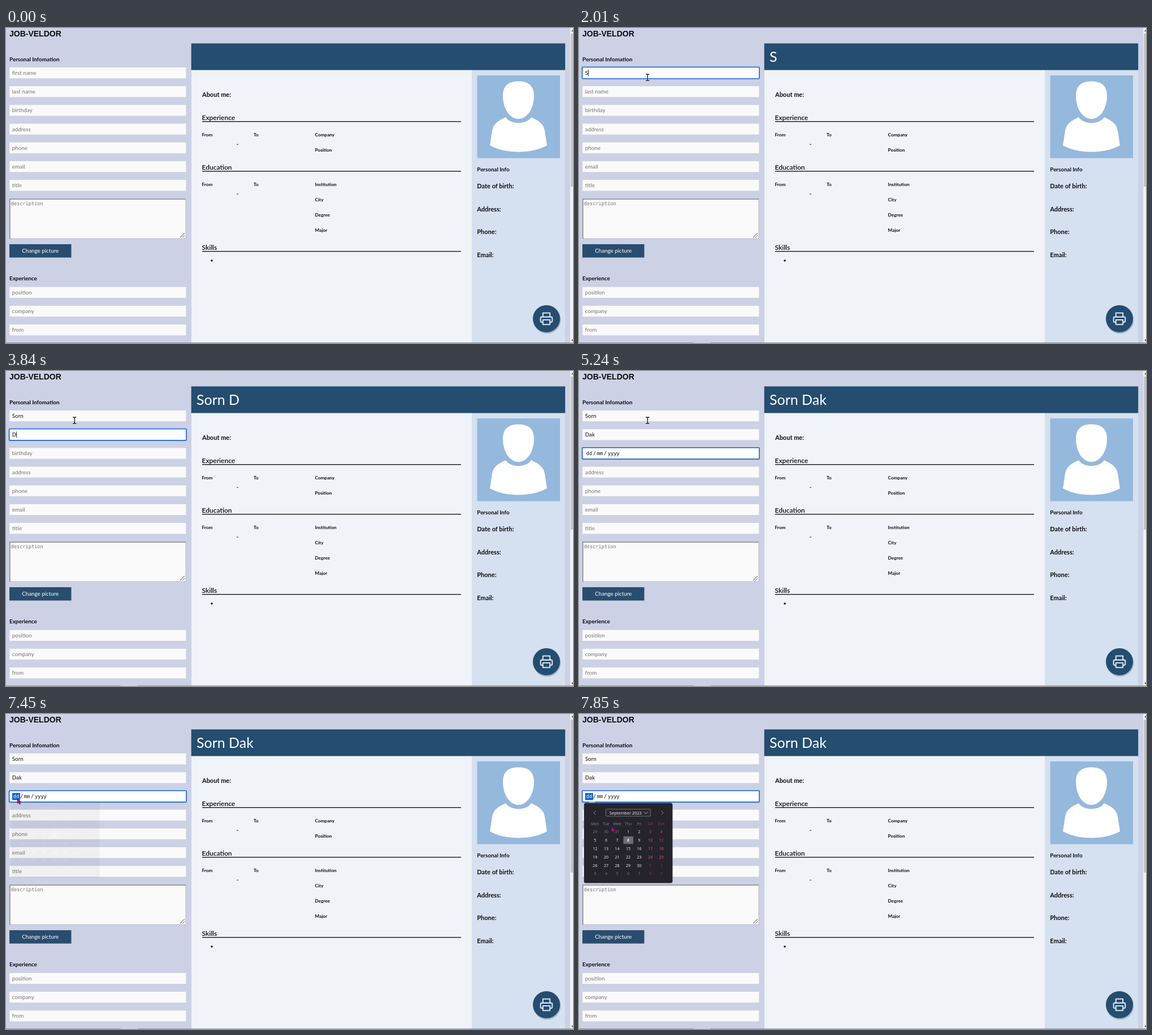
Animation of 1003 by 558 pixels, one loop 8000 ms. Source, as an HTML page:

```html
<!DOCTYPE html>
<html lang="en">
<head>
<meta charset="utf-8">
<title>Resume form</title>
<style>
html, body { margin: 0; width: 100%; height: 100%; overflow: hidden; background: #ccd1e5; }
svg { display: block; width: 100%; height: 100%; }
text { font-family: Lato, sans-serif; white-space: pre; }
.mono { font-family: "DejaVu Sans Mono", monospace; }
.arial { font-family: "Liberation Sans", sans-serif; }
.cal text { font-family: "Open Sans", sans-serif; }
</style>
</head>
<body>
<svg id="stage" viewBox="0 0 1003 558" preserveAspectRatio="none"></svg>
<script>
const LOOP = 8000;
const NS = "http://www.w3.org/2000/svg";
const stage = document.getElementById("stage");

function add(tag, attrs, parent = stage) {
  const el = document.createElementNS(NS, tag);
  for (const k in attrs) el.setAttribute(k, attrs[k]);
  parent.appendChild(el);
  return el;
}
const box = (x, y, width, height, fill, more, parent) =>
  add("rect", { x, y, width, height, fill, ...more }, parent);
const line = (d, stroke, width, parent) =>
  add("path", { d, stroke, "stroke-width": width, fill: "none" }, parent);
function label(str, x, y, size, more, parent) {
  const el = add("text", { x, y, "font-size": size, fill: "#0b0b0f", ...more }, parent);
  el.textContent = str;
  return el;
}
const bold = (str, x, y, size) => label(str, x, y, size, { "font-weight": 700 });
const show = (el, on) => el.setAttribute("visibility", on ? "visible" : "hidden");

// Page, scrollbar and bottom edge
box(0, 0, 1003, 558, "#ccd1e5");
box(998, 0, 5, 558, "#f1f1f3");
box(999, 10, 4, 271, "#c3c3c7");
add("path", { d: "M1000 6l2-3 2 3zM1000 552l2 3 2-3z", fill: "#606064" });

// Preview sheet
box(328, 74, 496, 484, "#f0f3f8");
box(824, 74, 165, 484, "#d5e0f0");
box(327.7, 27.3, 661.5, 47.2, "#244d70");
const headName = label("", 337, 60, 25, { fill: "#fff" });
bold("About me:", 347, 121.5, 11);
[["Experience", 163], ["Education", 251], ["Skills", 393]].forEach(([s, y]) => {
  label(s, 346.5, y, 12, { "font-weight": 600 });
  box(347, y + 2, 458, 1.4, "#15171c");
});
[192, 280].forEach(y => {
  bold("From", 346.5, y, 8.2);
  bold("To", 438, y, 8.2);
  box(408, y + 13.7, 3, 1, "#222");
});
["Company", "Position"].forEach((s, i) => bold(s, 546.6, 192 + 27 * i, 8.2));
["Institution", "City", "Degree", "Major"].forEach((s, i) => bold(s, 546.6, 280 + 27 * i, 8.2));
add("circle", { cx: 364, cy: 412, r: 1.8, fill: "#111" });

// Picture and contact column
box(833.5, 84, 146.5, 146.5, "#95b8dd");
add("path", { fill: "#fff", d:
  "M879 120C879 102 889 94.5 906.5 94.5S934 102 934 120C934 143 922 161 906.5 161S879 143 879 120Z" +
  "M884 158C892 171.5 921 171.5 929 158C944 165 951 170 953 182L957 208" +
  "C942 216 925 219.5 906.5 219.5S871 216 856 208L860 182C862 170 869 165 884 158Z" });
bold("Personal Info", 833.3, 254.3, 9.8);
["Date of birth:", "Address:", "Phone:", "Email:"].forEach((s, i) => bold(s, 833.3, 284 + 40.7 * i, 11));

// Print button
add("circle", { cx: 957, cy: 517, r: 24.3, fill: "#1b2b45", opacity: 0.25 });
add("circle", { cx: 956, cy: 515, r: 24, fill: "#244d70" });
const icon = add("g", { transform: "translate(943.6 502.6) scale(1.03)", "stroke-linejoin": "round" });
line("M6 9V2H18V9M6 18H4a2 2 0 0 1-2-2V11a2 2 0 0 1 2-2H20a2 2 0 0 1 2 2V16a2 2 0 0 1-2 2H18M6 14H18V22H6Z",
  "#d9e2ef", 2, icon);

// Form
label("JOB-VELDOR", 6, 14.6, 14, { class: "arial", "font-weight": 700 });
bold("Personal Infomation", 6, 58.6, 9.9);
bold("Experience", 6, 447.3, 9.9);

const PITCH = 33.2;
function makeField(hint, y) {
  const bg = box(6.3, y, 312, 19.2, "#fafafa");
  const text = label(hint, 10.8, y + 13, 9.8, { fill: "#757575" });
  return { hint, y, bg, text };
}
const fields = ["first name", "last name", "birthday", "address", "phone", "email", "title"]
  .map((s, i) => makeField(s, 69.9 + PITCH * i));
["position", "company", "from"].forEach((s, i) => makeField(s, 458.8 + PITCH * i));

box(6.5, 303, 311.5, 70, "#fafafa");
line("M318 303V373H6.5", "#b9bcc8", 1);
line("M6.8 373.5V303.2H318", "#76777d", 1.3);
label("description", 8.6, 313.8, 8.65, { class: "mono", fill: "#757575" });
line("M308 371L316 363M312 371L316 367", "#55565c", 1);
box(6, 383, 109.5, 23.6, "#294d6e");
label("Change picture", 60.7, 398.4, 9.8, { fill: "#fff", "text-anchor": "middle" });

box(0, 557, 1003, 1, "#8f93a3");
const edgeGap = box(203, 557, 30, 1, "#c9cde0");

// Date parts
const date = add("g", {});
const selection = box(11, 140, 14, 12.4, "#0f62c8", {}, date);
const dateParts = [["dd", 12.7], ["/", 25], ["mm", 31.8], ["/", 44], ["yyyy", 51]]
  .map(([s, x]) => label(s, x, 149.2, 8.65, { class: "mono" }, date));

const ring = box(5.6, 0, 313.4, 20.4, "none", { stroke: "#1766d1", "stroke-width": 1.6, rx: 1 });
const caret = box(0, 0, 0.9, 11, "#111");
const glow = add("circle", { r: 7, fill: "#e6e03c" });
const trace = add("ellipse", { cx: 23, cy: 156, rx: 5, ry: 2, fill: "#eeeaa0", opacity: 0.6 });

// Calendar popup
const clip = add("clipPath", { id: "under" }, add("defs", {}));
box(0, 157, 200, 200, "#000", {}, clip);
const popup = add("g", { class: "cal", "clip-path": "url(#under)" });
const cal = add("g", {}, popup);
box(8.8, 157.5, 156.7, 142, "#25242d", { rx: 3.5 }, cal);
line("M29.5 171.5L26 175L29.5 178.5M145.5 171.5L149 175L145.5 178.5", "#9a9aa2", 0.9, cal);
box(47.5, 168.5, 79, 12.6, "#2b2a33", { stroke: "#77777f", "stroke-width": 0.9, rx: 1 }, cal);
label("September 2022", 54, 177.7, 7.4, { fill: "#f4f4f6" }, cal);
line("M115.3 173.4L118.3 176.6L121.3 173.4", "#c8c8ce", 0.9, cal);
box(78.5, 216.8, 17.5, 13.4, "#6c6c72", { rx: 1 }, cal);
const colX = c => 28.4 + 19.55 * c;
["Mon", "Tue", "Wed", "Thu", "Fri", "Sat", "Sun"].forEach((s, c) =>
  label(s, colX(c), 196.5, 6.7, { fill: c > 4 ? "#8f3f46" : "#85858d", "text-anchor": "middle" }, cal));
for (let i = 0; i < 42; i++) {
  const c = i % 7, n = i - 2;
  const inside = n >= 1 && n <= 30;
  const day = n < 1 ? n + 31 : n > 30 ? n - 30 : n;
  const fill = c > 4 ? (inside ? "#ee5560" : "#7d363d") : (inside ? "#f4f4f6" : "#797981");
  label(day, colX(c), 211.2 + 14.85 * Math.floor(i / 7), 7.1,
    { fill, "text-anchor": "middle", "font-weight": n === 8 ? 700 : 400 }, cal);
}

// Pointers
const beam = add("g", {});
const beamShape = "M-3-5.5H-.8L0-4.8L.8-5.5H3M0-5V5M-3 5.5H-.8L0 4.8L.8 5.5H3";
line(beamShape, "#fff", 2.4, beam).setAttribute("opacity", 0.5);
line(beamShape, "#111", 1.3, beam);
const arrow = add("path", { d: "M0 0V8.6L2 7L3.7 10L5.3 9.2L3.8 6.4L6.6 6Z",
  fill: "#c4087e", stroke: "#5a1248", "stroke-width": 0.7 });

// Key times at which each character lands
const FIRST = ["Sorn", [1810, 2210, 2610, 3010]];
const LAST = ["Dak", [3840, 4240, 4440]];
const typed = ([word, times], t) => word.slice(0, times.filter(k => t >= k).length);

const mix = (a, b, u) => a + (b - a) * u;
const bend = (a, b, c, u) => mix(mix(a, b, u), mix(b, c, u), u);
const stepOf = (t, start, count) => Math.min(1, (Math.floor((t - start) / 200) + 1) / count);

function pointer(t) {
  if (t < 200) return null;
  if (t < 1200) {
    const u = stepOf(t, 200, 5) - 0.2;
    const e = u / 0.8;
    const s = e * e * (3 - 2 * e);
    return [mix(373, 118.5, s), mix(546, 87, s)];
  }
  if (t < 1410) return [118.5, 87];
  if (t < 6650) return [121.3, 87.5];
  if (t < 7850) {
    const u = stepOf(t, 6650, 4);
    return [bend(121.3, 60, 20.3, u), bend(87.5, 28, 150, u)];
  }
  return [57.5, 200];
}

function overText([x, y]) {
  return x > 6 && x < 318 && y < 375 &&
    (y > 303 || fields.some((f, i) => i !== 2 && y > f.y && y < f.y + 19.2));
}

function setText(el, str) {
  if (el.textContent !== str) el.textContent = str;
}

function render(t) {
  const words = [typed(FIRST, t), typed(LAST, t)];
  setText(headName, words.filter(Boolean).join(" "));
  words.forEach((w, i) => {
    setText(fields[i].text, w || fields[i].hint);
    fields[i].text.setAttribute("fill", w ? "#111" : "#757575");
  });

  const focus = t < 1200 ? -1 : t < 3230 ? 0 : t < 5240 ? 1 : 2;
  show(ring, focus >= 0);
  fields.forEach((f, i) => f.bg.setAttribute("fill", i === focus ? "#fff" : "#fafafa"));
  if (focus >= 0) ring.setAttribute("y", fields[focus].y - 0.6);

  const caretOn = (focus === 0 || focus === 1) && t < 4840;
  show(caret, caretOn);
  if (caretOn) {
    const f = fields[focus];
    const w = words[focus] ? f.text.getComputedTextLength() : 0;
    caret.setAttribute("x", 10.8 + w);
    caret.setAttribute("y", f.y + 4.3);
  }

  show(date, focus === 2);
  show(fields[2].text, focus !== 2);
  const picked = t >= 7250;
  selection.setAttribute("opacity", picked ? 1 : 0);
  dateParts[0].setAttribute("fill", picked ? "#fff" : "#111");

  const p = pointer(t);
  const isBeam = p && overText(p) && t < 7250;
  show(beam, isBeam);
  show(arrow, p && !isBeam);
  if (p) (isBeam ? beam : arrow).setAttribute("transform", `translate(${p[0]} ${p[1]})`);

  const pressed = t >= 1200 && t < 1410 || t >= 7250 && t < 7450;
  show(glow, pressed);
  if (pressed) {
    glow.setAttribute("cx", p[0]);
    glow.setAttribute("cy", p[1]);
  }
  show(trace, t >= 7650);
  show(edgeGap, t >= 1410);

  show(popup, t >= 7450);
  popup.setAttribute("opacity", t < 7650 ? 0.04 : 1);
  cal.setAttribute("transform", `translate(0 ${t < 7650 ? -9 : 0})`);
}

const start = performance.now();
function tick() {
  render((performance.now() - start) % LOOP);
  requestAnimationFrame(tick);
}
render(0);
requestAnimationFrame(tick);
</script>
</body>
</html>
```
